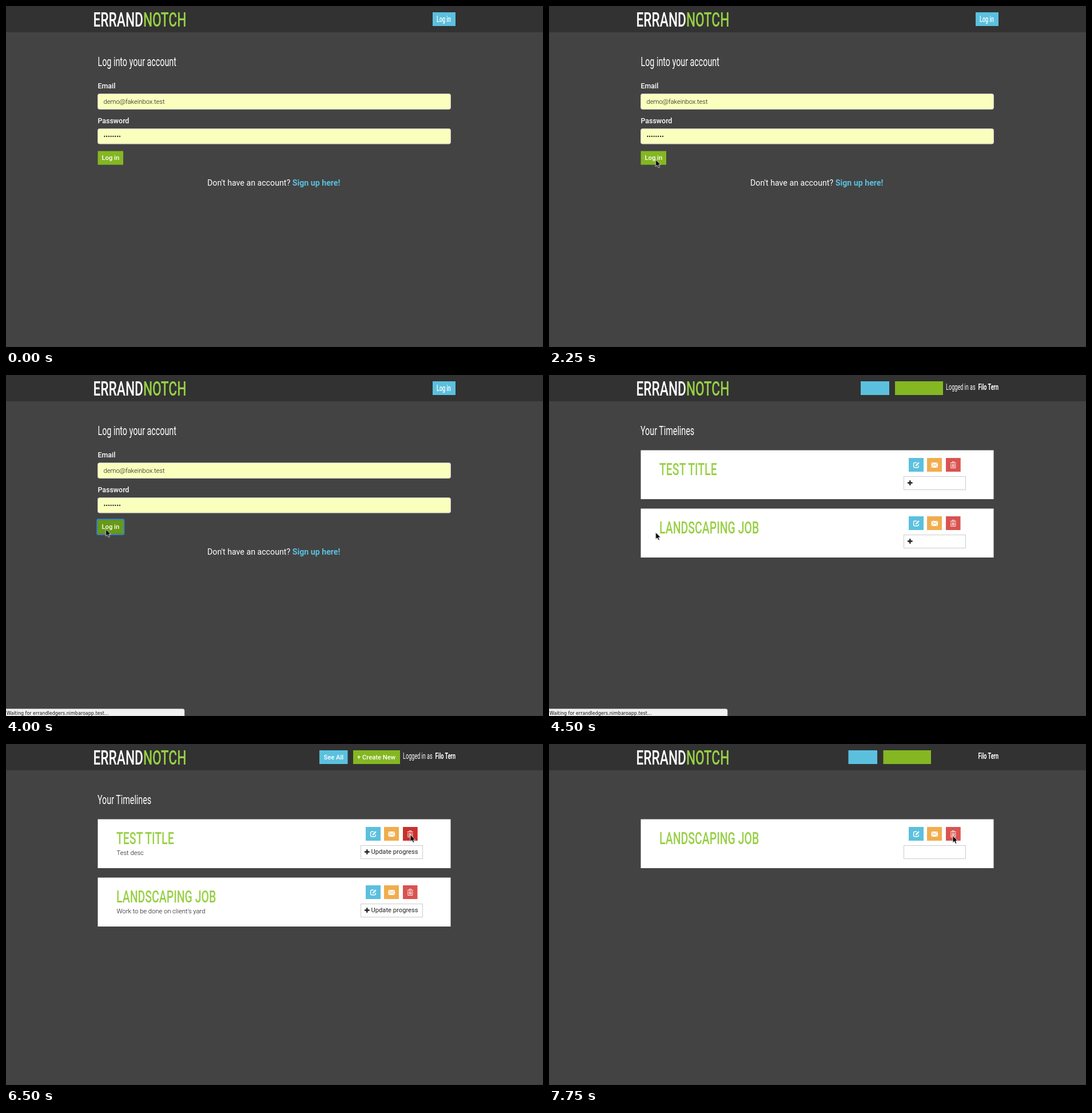
These frames come from a looping animation (939x596 px, 8000 ms). An HTML page:

```html
<!DOCTYPE html>
<html lang="en">
<head>
<meta charset="utf-8">
<title>Timelines</title>
<style>
  html, body { margin: 0; width: 100%; height: 100%; overflow: hidden; background: #434343; }
  svg { display: block; width: 100%; height: 100%; }
  text { font: 400 11.2px Roboto, sans-serif; fill: #fff; white-space: pre; }

  /* one shared condensed face for headings and the top bar */
  .narrow { font-size: 14px; transform: scaleX(.65); transform-box: fill-box; transform-origin: left; }
  .right { text-anchor: end; transform-origin: right; }
  .logo { font-size: 35px; font-weight: 500; }
  .heading { font-size: 22px; }
  .title { font-size: 30px; font-weight: 500; }
  .lime { fill: #98d045; }
  .label { font-size: 12.4px; font-weight: 500; }
  .strong { font-weight: 500; }
  .bold { font-weight: 700; }
  .prompt { font-size: 14.2px; }
  .link { fill: #5bc0de; font-weight: 700; }
  .dark { fill: #222; }
  .light { font-weight: 300; fill: #111; }
  .status text { font: 8px "DejaVu Sans", sans-serif; fill: #111; }
  .field { fill: #faffbd; stroke: #ccc; }
  .blue { fill: #5bc0de; }
  .green { fill: #84b722; }
  .amber { fill: #f0ad4e; }
  .red { fill: #d9534f; }

  .login, .list, .ready, .blank, .before, .after, .ring, .wait, .url, .submit, .trash, .cursor {
    animation: 8s step-end infinite;
  }
  .login  { animation-name: login; }
  .list   { animation-name: list; }
  .blank  { animation-name: blank; }
  .ready  { animation-name: ready; }
  .before { animation-name: before; }
  .after  { animation-name: after; }
  .ring   { animation-name: ring; }
  .wait   { animation-name: wait; }
  .url    { animation-name: url; }
  .submit { animation-name: submit; }
  .trash  { animation-name: trash; }
  .cursor { animation-name: cursor; }

  @keyframes login  { 0% { opacity: 1 } 56.25%, 100% { opacity: 0 } }
  @keyframes list   { 0% { opacity: 0 } 56.25%, 100% { opacity: 1 } }
  @keyframes blank  { 0% { opacity: 0 } 56.25% { opacity: 1 } 59.375%, 100% { opacity: 0 } }
  @keyframes ready  { 0% { opacity: 0 } 59.375% { opacity: 1 } 96.875%, 100% { opacity: 0 } }
  @keyframes before { 0% { opacity: 1 } 96.875%, 100% { opacity: 0 } }
  @keyframes after  { 0% { opacity: 0 } 96.875%, 100% { opacity: 1 } }
  @keyframes ring   { 0% { opacity: 0 } 40.625%, 100% { opacity: 1 } }
  @keyframes wait   { 0% { opacity: 0 } 50% { opacity: 1 } 62.5% { opacity: .5 } 65.625%, 100% { opacity: 0 } }
  @keyframes url    { 0% { opacity: 0 } 84.375% { opacity: 1 } 96.875%, 100% { opacity: 0 } }
  @keyframes submit {
    0% { fill: #84b722 } 37.5% { fill: #71a11b } 40.625% { fill: #5b8513 } 43.75%, 100% { fill: #679a17 }
  }
  @keyframes trash {
    0% { fill: #d9534f } 81.25% { fill: #c9302c } 87.5% { fill: #ac2925 }
    90.625% { fill: #c9302c } 96.875%, 100% { fill: #d9534f }
  }
  @keyframes cursor {
    0%      { transform: translate(306px, 238px); opacity: 0 }
    12.5%   { transform: translate(306px, 238px); opacity: 1 }
    15.625% { transform: translate(205px, 323px) }
    18.75%  { transform: translate(169px, 280px) }
    21.875% { transform: translate(184px, 267px) }
    25%     { transform: translate(188px, 268px) }
    28.125% { transform: translate(186.5px, 268.5px) }
    37.5%   { transform: translate(176px, 270px) }
    40.625% { transform: translate(174.5px, 269.5px) }
    56.25%  { transform: translate(186.5px, 275px) }
    59.375% { transform: translate(186.5px, 279.5px) }
    62.5%   { transform: translate(192px, 280px) }
    65.625% { transform: translate(217px, 270px) }
    68.75%  { transform: translate(324.5px, 203px) }
    71.875% { transform: translate(332.5px, 200.5px) }
    75%     { transform: translate(361.5px, 198.5px) }
    78.125% { transform: translate(600.5px, 169px) }
    81.25%  { transform: translate(707px, 158.5px) }
    84.375%, 100% { transform: translate(706px, 160.5px); opacity: 1 }
  }
</style>
</head>
<body>
<svg viewBox="0 0 939 596">
  <defs>
    <g id="card">
      <rect x="160.5" y="131.5" width="617" height="85.5" fill="#fff"/>
      <rect class="blue" x="629" y="145" width="26" height="24"/>
      <rect class="amber" x="661" y="145" width="26" height="24"/>
      <rect class="red" x="694" y="145" width="25.5" height="24"/>
      <rect x="620.5" y="177.5" width="108" height="23" fill="#fff" stroke="#ccc"/>
    </g>
    <g id="icons" fill="none" stroke="#fff">
      <path d="M643 153.2h-3.4q-2 0-2 2v4.6q0 2 2 2h4.6q2 0 2-2v-1.6" stroke-width="1.4"/>
      <path d="M641.3 158.8l5.6-5.6" stroke-width="2.4"/>
      <path d="M668.5 153h11.5v9h-11.5z" fill="#fff" stroke="none"/>
      <path d="M668.5 153.2l5.75 5 5.75-5M668.5 162l4-4.4M680 162l-4-4.4" stroke="#f0ad4e"/>
      <path d="M701.5 153.6h10.5M705 153.2v-1.6h3.6v1.6M702.8 155.3v7.2h8v-7.2M705.2 155.5v5.5M706.8 155.5v5.5M708.4 155.5v5.5" stroke-width=".9"/>
    </g>
    <path id="plus" d="M627 188.5h8.6M631.3 184.2v8.6" stroke="#222" stroke-width="2.4"/>
    <path id="bubble" d="M0 583.5h309q3 0 3 3V596H0z" fill="#f1f1f1" stroke="#bbb" stroke-width=".6"/>
  </defs>

  <rect width="939" height="596" fill="#434343"/>
  <rect width="939" height="46" fill="#323232"/>
  <rect y="595" width="939" height="1" fill="#3b3b3b"/>
  <text class="narrow logo" x="152.5" y="36">ERRAND<tspan class="lime">NOTCH</tspan></text>

  <g class="login">
    <rect class="blue" x="746" y="11" width="40" height="24"/>
    <text class="narrow strong" x="753" y="28">Log in</text>
    <text class="narrow heading" x="160.5" y="105.5">Log into your account</text>
    <text class="label" x="160.5" y="144">Email</text>
    <rect class="field" x="160.5" y="153.5" width="617" height="27" rx="3"/>
    <text class="light" x="170.5" y="171">demo@fakeinbox.test</text>
    <text class="label" x="160.5" y="205">Password</text>
    <rect class="field" x="160.5" y="214.5" width="617" height="26.5" rx="3"/>
    <text class="dark" x="170.5" y="231.5">••••••••</text>
    <rect class="ring" x="159.5" y="252.5" width="46.5" height="26" rx="2" fill="none" stroke="#3b86bd" stroke-width="2.5"/>
    <rect class="submit" x="160.5" y="253.5" width="44.5" height="24"/>
    <text class="strong" x="167.5" y="269">Log in</text>
    <text class="prompt" x="352" y="314">Don't have an account? <tspan class="link">Sign up here!</tspan></text>
  </g>

  <g class="list">
    <g class="blank">
      <rect class="blue" x="545" y="11" width="50" height="24"/>
      <rect class="green" x="605" y="11" width="84" height="24"/>
    </g>
    <g class="ready">
      <rect class="blue" x="548" y="11" width="49.5" height="24"/>
      <rect class="green" x="607" y="11" width="82" height="24"/>
      <text class="strong" x="555.5" y="27">See All</text>
      <text class="strong" x="614" y="27">+ Create New</text>
    </g>
    <g class="after">
      <rect class="blue" x="523.5" y="11" width="50.5" height="24"/>
      <rect class="green" x="584.5" y="11" width="83.5" height="24"/>
    </g>
    <text class="narrow right" x="786" y="26.5"><tspan class="bold">Filo Tern</tspan></text>

    <use href="#card"/>
    <rect class="trash" x="694" y="145" width="25.5" height="24"/>
    <use href="#icons"/>
    <g class="before">
      <text class="narrow right" x="748" y="26.5">Logged in as </text>
      <text class="narrow heading" x="160" y="105.5">Your Timelines</text>
      <text class="narrow title lime" x="193" y="175">TEST TITLE</text>
      <use href="#plus"/>
      <g transform="translate(0 102)">
        <use href="#card"/>
        <use href="#icons"/>
        <use href="#plus"/>
        <text class="narrow title lime" x="193" y="175">LANDSCAPING JOB</text>
      </g>
    </g>
    <g class="ready">
      <text class="light" x="193.5" y="194">Test desc</text>
      <text class="dark" x="638.5" y="192">Update progress</text>
      <text class="light" x="193.5" y="296">Work to be done on client's yard</text>
      <text class="dark" x="638.5" y="294">Update progress</text>
    </g>
    <text class="narrow title lime after" x="193" y="175">LANDSCAPING JOB</text>
  </g>

  <g class="status wait">
    <use href="#bubble"/>
    <text x="1" y="593.5">Waiting for errandledgers.nimbaroapp.test...</text>
  </g>
  <g class="status url">
    <use href="#bubble"/>
    <text x="1" y="593.5">https://errandledgers.nimbaroapp.test/timeline/21/delete</text>
  </g>

  <path class="cursor" d="M0 0V12.2L2.8 9.6L4.8 14L6.9 13.1L5 8.9H8.8Z" stroke="#fff" stroke-width=".8"/>
</svg>
</body>
</html>
```
